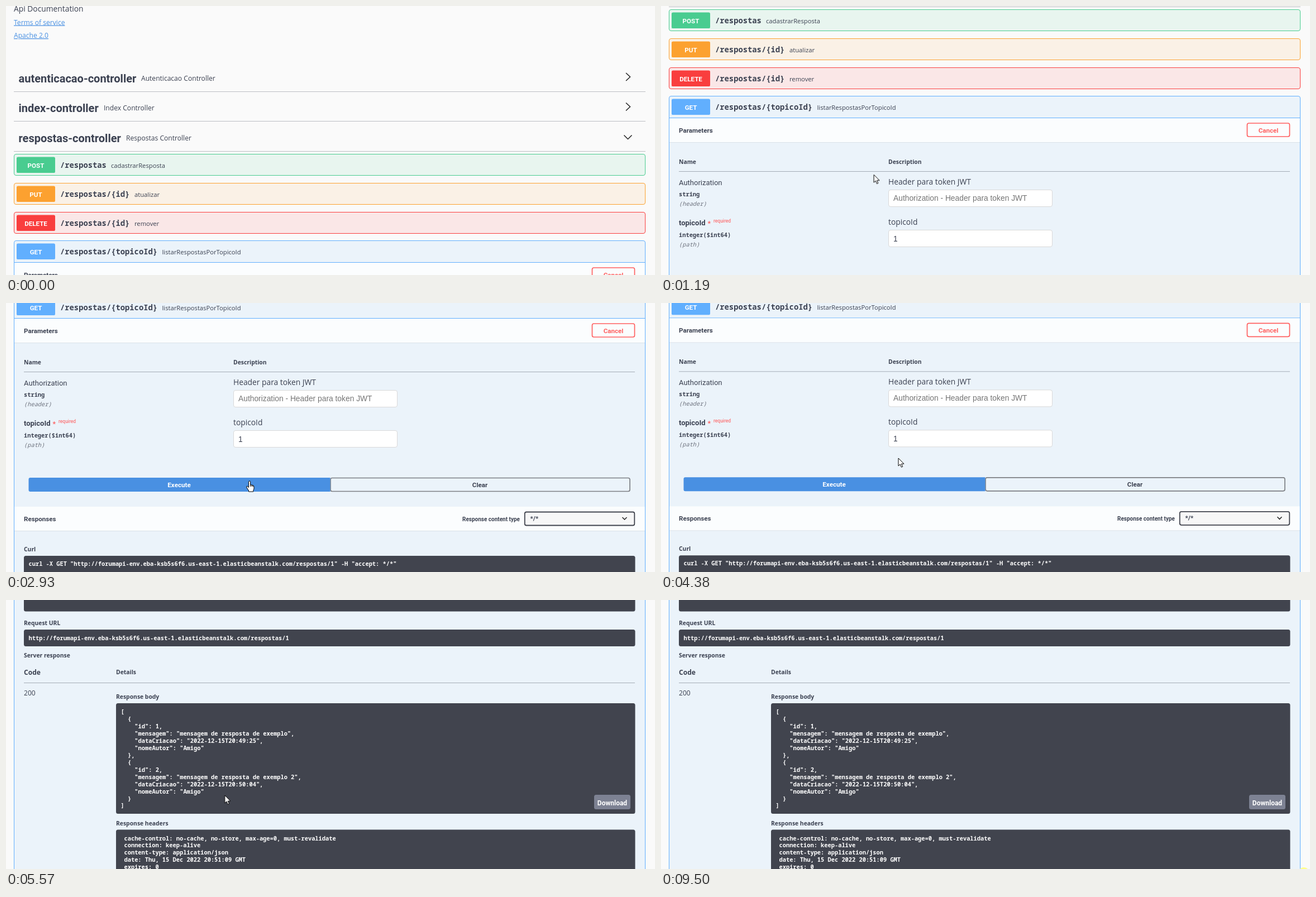
Animation, 1162 px wide and 482 px high, one loop 9.57 s. Source, as an HTML page:

```html
<!DOCTYPE html>
<html lang="pt">
<head>
<meta charset="utf-8">
<title>Api Documentation</title>
<style>
html, body { margin: 0; width: 100%; height: 100%; overflow: hidden; background: #fafafa; }
svg { display: block; }
text { fill: #3b4151; font-family: "Open Sans", sans-serif; white-space: pre; }

/* type */
.p { font-size: 13.82px; }
.s { font-size: 12.1px; }
.xs { font-size: 11.23px; }
.lab { font-size: 10.37px; font-weight: 700; }
.link { font-size: 12.1px; fill: #4990e2; text-decoration: underline; }
.tag, .btn, .name, .req { font-family: Roboto, sans-serif; }
.tag { font-size: 20px; font-weight: 700; }
.btn { font-size: 11.6px; font-weight: 700; }
.name { font-size: 13px; }
.req { font-size: 8.5px; fill: #f55; }
.field { font: 13.82px "Liberation Sans", Arial, sans-serif; }
.path, .code, .type { font-family: "Noto Sans Mono", monospace; font-weight: 600; }
.path { font-size: 13.82px; }
.code, .type { font-size: 10.37px; }
.code { fill: #fff; font-weight: 700; }
.in { font-weight: 400; font-style: italic; fill: #6e737f; }
.mid { text-anchor: middle; }
.bold { font-weight: 700; }
.white { fill: #fff; }

/* shapes */
.rule { fill: #3b4151; fill-opacity: .32; }
.thin { fill: #3b4151; fill-opacity: .4; }
.chev { fill: none; stroke: #222; stroke-width: 1.5; }
.head { fill: #fbfdfe; }
.edge { fill: #000; fill-opacity: .07; }
.input { fill: #fff; stroke: #d9d9d9; }
.dark { fill: #41444e; }

/* motion: one 9570 ms loop */
#page, #late, #ring, #mouse, #hand, #arrow, #glow { animation: 9570ms linear infinite; }
#page { animation-name: scroll; }
#late { animation-name: push; }
#ring { animation-name: ring; transform-origin: 579.5px 831px; }
#mouse { animation-name: move; }
#hand { animation-name: hand; }
#arrow { animation-name: arrow; }
#glow { animation-name: glow; }

@keyframes scroll {
  0%, 4.7% { transform: translateY(0); }
  6.48%, 6.9% { transform: translateY(-86px); }
  7.31% { transform: translateY(-112px); }
  8.57%, 10.45% { transform: translateY(-173px); }
  12.02%, 14.11% { transform: translateY(-259px); }
  15.36% { transform: translateY(-340px); }
  15.78%, 21.21% { transform: translateY(-346px); }
  22.99%, 45.77% { transform: translateY(-432px); }
  49.11%, 50.16% { transform: translateY(-691px); }
  54.34%, 100% { transform: translateY(-950px); }
}
@keyframes push {
  0%, 35.94% { transform: translateY(0); }
  35.95%, 40.74% { transform: translateY(86px); }
  40.75%, 100% { transform: translateY(0); }
}
@keyframes ring {
  0%, 35.94% { opacity: 0; transform: rotate(0); }
  35.95% { opacity: 1; transform: rotate(0); }
  40.74% { opacity: 1; transform: rotate(165deg); }
  40.75%, 100% { opacity: 0; transform: rotate(165deg); }
}
@keyframes move {
  0%, .73% { transform: translate(470px, 495px); }
  5.22% { transform: translate(394px, 312px); }
  6.79%, 10.24% { transform: translate(391px, 307px); }
  15.36%, 20.9% { transform: translate(368px, 296px); }
  27.17%, 35.74% { transform: translate(436px, 319px); }
  40.75% { transform: translate(428px, 240px); }
  45.04%, 49.6% { transform: translate(425px, 278px); }
  54.34%, 56% { transform: translate(424px, 302px); }
  58.2% { transform: translate(392px, 350px); }
  61.65% { transform: translate(319px, 340px); }
  65.52% { transform: translate(360px, 364px); }
  68.44% { transform: translate(156px, 300px); }
  70.22% { transform: translate(600px, 175px); }
  71.99%, 74.3% { transform: translate(1104px, 167px); }
  76.8% { transform: translate(1095px, 357px); }
  78.89% { transform: translate(600px, 350px); }
  81.5% { transform: translate(153px, 310px); }
  84.74% { transform: translate(175px, 250px); }
  87.77% { transform: translate(560px, 246px); }
  91.95% { transform: translate(1076px, 420px); }
  94.46%, 100% { transform: translate(1076px, 495px); }
}
@keyframes hand {
  0%, 8.1% { opacity: 1; }
  8.11%, 25.99% { opacity: 0; }
  26%, 36.5% { opacity: 1; }
  36.51%, 100% { opacity: 0; }
}
@keyframes arrow {
  0%, 8.1% { opacity: 0; }
  8.11%, 25.99% { opacity: 1; }
  26%, 36.5% { opacity: 0; }
  36.51%, 100% { opacity: 1; }
}
@keyframes glow {
  0%, 99.26% { opacity: 0; }
  99.27%, 100% { opacity: 1; }
}
</style>
</head>
<body>
<svg width="1162" height="482" viewBox="0 0 1162 482">
  <g id="page">
    <text class="p" x="14" y="10">Api Documentation</text>
    <text class="link" x="14" y="33.5">Terms of service</text>
    <text class="link" x="14" y="57">Apache 2.0</text>

    <text class="tag" x="22.5" y="136.5">autenticacao-controller</text>
    <text class="s" x="242" y="133.5">Autenticacao Controller</text>
    <path class="chev" d="M1110 120l7.5 7-7.5 7"/>
    <rect class="rule" x="14" y="153" width="1131" height="1"/>

    <text class="tag" x="22.5" y="190">index-controller</text>
    <text class="s" x="175" y="187">Index Controller</text>
    <path class="chev" d="M1110 173.5l7.5 7-7.5 7"/>
    <rect class="rule" x="14" y="206" width="1131" height="1"/>

    <text class="tag" x="22.5" y="243.5">respostas-controller</text>
    <text class="s" x="215" y="240.5">Respostas Controller</text>
    <path class="chev" d="M1106.5 231.5l7 7 7-7"/>
    <rect class="rule" x="14" y="260" width="1131" height="1"/>

    <g id="ops"></g>

    <!-- parameters -->
    <rect x="15" y="459" width="1129" height="1" fill="#61affe"/>
    <rect class="head" x="15" y="460" width="1129" height="43"/>
    <rect class="edge" x="15" y="503" width="1129" height="1"/>
    <text class="btn" x="32" y="486">Parameters</text>
    <rect x="1049.5" y="469" width="76" height="24" rx="3" fill="none" stroke="#ff6060" stroke-width="1.7"/>
    <text class="btn mid" x="1087.5" y="485.5" style="fill:#ff6060">Cancel</text>

    <text class="lab" x="32" y="541.5">Name</text>
    <text class="lab" x="407" y="541.5">Description</text>
    <rect class="thin" x="32" y="555" width="1094" height="1"/>

    <text class="name" x="32" y="580">Authorization</text>
    <text class="type" x="32" y="600">string</text>
    <text class="type in" x="32" y="617">(header)</text>
    <text class="p" x="407" y="579">Header para token JWT</text>
    <rect class="input" x="407.5" y="588.5" width="293" height="30" rx="3.5"/>
    <text class="field" x="416" y="608" style="fill:#757575">Authorization - Header para token JWT</text>

    <text class="name bold" x="32" y="652">topicoId</text>
    <text class="name" x="83.5" y="653" style="fill:#f55">*</text>
    <text class="req" x="94" y="647">required</text>
    <text class="type" x="32" y="672.5">integer($int64)</text>
    <text class="type in" x="32" y="689.5">(path)</text>
    <text class="p" x="407" y="651">topicoId</text>
    <rect class="input" x="407.5" y="660.5" width="293" height="30" rx="3.5"/>
    <text class="field" x="416" y="680.5">1</text>

    <rect x="581" y="745.5" width="536" height="24" rx="3" fill="none" stroke="#7d7f84" stroke-width="1.7"/>
    <path d="M580.5 745V770H43.5a3 3 0 0 1-3-3V748a3 3 0 0 1 3-3z" fill="#4990e2"/>
    <text class="btn mid white" x="310" y="761.5">Execute</text>
    <text class="btn mid" x="848.5" y="761.5">Clear</text>

    <g id="ring" fill="none" stroke-width="1.7">
      <circle cx="579.5" cy="831" r="25" stroke="#555" stroke-opacity=".1"/>
      <path d="M561.8 813.3a25 25 0 0 1 35.4 0" stroke="#000" stroke-opacity=".6"/>
    </g>

    <!-- responses -->
    <g id="late">
      <rect class="head" x="15" y="797" width="1129" height="43"/>
      <rect class="edge" x="15" y="840" width="1129" height="1"/>
      <text class="btn" x="32" y="823">Responses</text>
      <text class="btn" x="817" y="822.5" style="font-size:10px">Response content type</text>
      <rect x="928.8" y="806.5" width="196.5" height="24" rx="3" fill="#f7f7f7" stroke="#41444e" stroke-width="1.8"/>
      <text class="btn" x="938.5" y="822">*/*</text>
      <path class="chev" d="M1103.5 816l4 4 4-4"/>

      <text class="lab" x="32" y="877">Curl</text>
      <rect class="dark" x="32" y="885" width="1094.5" height="85.5" rx="3.5"/>
      <text class="code" x="40.5" y="902.5">curl -X GET "http://forumapi-env.eba-ksb5s6f6.us-east-1.elasticbeanstalk.com/respostas/1" -H "accept: */*"</text>

      <text class="lab" x="32" y="995">Request URL</text>
      <rect class="dark" x="32" y="1003" width="1094.5" height="30" rx="3.5"/>
      <text class="code" x="40.5" y="1022">http://forumapi-env.eba-ksb5s6f6.us-east-1.elasticbeanstalk.com/respostas/1</text>

      <text class="lab" x="32" y="1053">Server response</text>
      <text class="s bold" x="32" y="1083.5">Code</text>
      <text class="lab" x="197" y="1083">Details</text>
      <rect class="thin" x="32" y="1098" width="1094" height="1"/>
      <text class="s" x="32" y="1120.5">200</text>

      <text class="lab" x="197" y="1127">Response body</text>
      <rect class="dark" x="197" y="1135" width="929.5" height="198" rx="3.5"/>
      <g id="body"></g>
      <rect x="1053" y="1299" width="65" height="26" rx="3.5" fill="#7d8293"/>
      <text class="btn mid white" x="1085.5" y="1317.5" style="font-size:12px">Download</text>

      <text class="lab" x="197" y="1353.5">Response headers</text>
      <rect class="dark" x="197" y="1361.5" width="929.5" height="150" rx="3.5"/>
      <g id="headers"></g>
    </g>
  </g>

  <circle id="glow" cx="1151" cy="488.7" r="9.7" fill="#ffff8c"/>

  <g id="mouse" fill="#fff" stroke="#000" stroke-linejoin="round">
    <path id="arrow" d="M0 0V14L3.2 11 5.4 16.2 7.7 15.2 5.5 10.2H10Z"/>
    <path id="hand" d="M-1.6 1.5Q-1.6 0 0 0T1.6 1.5V6.5L6.5 7.8Q8 8.5 8 10V13Q8 15 6.8 16.5V19H-1.5V17Q-4 14-5.2 11-5.5 9-3.8 9.2L-1.6 11.5ZM1.6 6.5V10M4 7.2V10M6.2 7.8V10.4"/>
  </g>
</svg>
<script>
const $ = id => document.getElementById(id);

// verb, path, summary, summary x, colour, fill, height
const ops = [
  ["POST", "/respostas", "cadastrarResposta", 188, "#49cc90", "#e8f5ef", 38],
  ["PUT", "/respostas/{id}", "atualizar", 230, "#fca130", "#faf1e6", 38],
  ["DELETE", "/respostas/{id}", "remover", 230, "#f93e3e", "#fae7e7", 38],
  ["GET", "/respostas/{topicoId}", "listarRespostasPorTopicoId", 279.5, "#61affe", "#ebf3fa", 1200]
];
$("ops").innerHTML = ops.map(([verb, path, note, x, color, fill, h], i) => {
  const y = 265.5 + Math.round(i * 51.8);
  return `<rect x="14.5" y="${y}" width="1130" height="${h}" rx="3.5" fill="${fill}" stroke="${color}"/>
    <rect x="19" y="${y + 5}" width="69" height="28.5" rx="2.6" fill="${color}"/>
    <text class="btn mid white" x="53.5" y="${y + 24}">${verb}</text>
    <text class="path" x="97" y="${y + 24.5}">${path}</text>
    <text class="xs" x="${x}" y="${y + 24}">${note}</text>`;
}).join("");

const lines = (id, x, y, list) => {
  $(id).innerHTML = list.map((s, i) =>
    `<text class="code" x="${x}" y="${y + i * 12.96}">${s}</text>`).join("");
};
const reply = (id, mensagem, time) =>
  ({ id, mensagem, dataCriacao: "2022-12-15T" + time, nomeAutor: "Amigo" });

lines("body", 205.5, 1154, JSON.stringify([
  reply(1, "mensagem de resposta de exemplo", "20:49:25"),
  reply(2, "mensagem de resposta de exemplo 2", "20:50:04")
], null, 2).split("\n"));

lines("headers", 211.5, 1380.5, [
  "cache-control: no-cache, no-store, max-age=0, must-revalidate",
  "connection: keep-alive",
  "content-type: application/json",
  "date: Thu, 15 Dec 2022 20:51:09 GMT",
  "expires: 0"
]);
</script>
</body>
</html>
```
